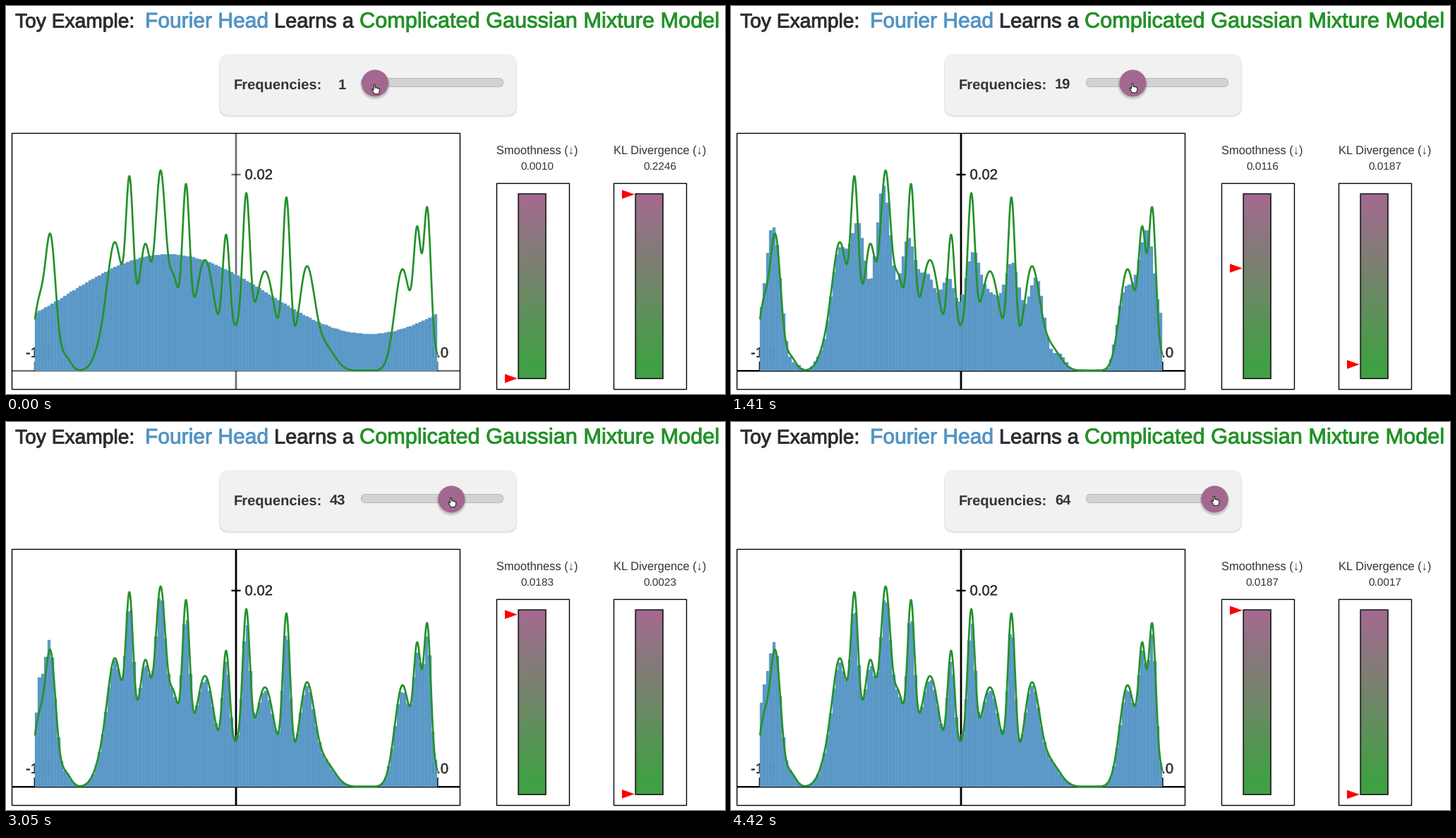
A matplotlib script for the animation above (4490 ms loop, 1019x550 px).

```python
import numpy as np
import matplotlib.pyplot as plt
import matplotlib.patheffects as pe
from matplotlib.animation import FuncAnimation
from matplotlib.collections import PolyCollection
from matplotlib.patches import Circle, FancyBboxPatch, Polygon, Rectangle

W, H, DPI = 1019, 550, 100
LOOP, FRAMES = 4490, 225
PX = 72 / DPI
BINS, LEFT, RIGHT, BASE = 128, 41, 611.5, 517
SPAN = RIGHT - LEFT
FIRST, LAST, REDRAWS = 140, 4420, 65

BLUE, GREEN, PLUM, INK = "#5494c4", "#24922a", "#a2688f", "#333333"

plt.rcParams["font.family"] = "Liberation Sans"
plt.rcParams["text.hinting"] = "no_hinting"

# Gaussians by width: the centre of each and the curve's height there
MIXTURE = {
    5.2: [(175, 276), (255, 265), (312, 193), (340.5, 252), (397.5, 246),
          (583, 205), (597, 232), (610, 28)],
    7.5: [(46, 102), (63, 194), (84, 23), (185, 127), (198, 180),
          (219, 284), (238, 135), (327, 67)],
    11: [(136, 69), (155, 182), (426, 148), (562, 144)],
    14: [(282, 157), (367, 141), (452, 42)],
}
CENTRE, LEVEL, SIGMA = np.array(
    [(x, y, s) for s, group in MIXTURE.items() for x, y in group]).T


def bells(x):
    return np.exp(-0.5 * ((np.asarray(x)[:, None] - CENTRE) / SIGMA) ** 2)


WEIGHT = np.linalg.solve(bells(CENTRE), LEVEL)


def density(x):
    return np.maximum(bells(x) @ WEIGHT, 0.4)


def bin_target():
    """Bin averages of the curve, with extra mass at the left edge."""
    x = LEFT + (np.arange(BINS * 4) + 0.5) * SPAN / (BINS * 4)
    y = (density(x - 1.5) + density(x) + density(x + 1.5)) / 3
    y = 0.975 * y + 40 * np.exp(-((x - 49) / 15) ** 2)
    return y.reshape(BINS, 4).mean(axis=1)


def fourier_fit(target, freq, rounds=120):
    """Non-negative Fourier series of a given degree, by maximum likelihood."""
    if freq == 1:
        x = LEFT + (np.arange(BINS) + 0.5) * SPAN / BINS
        return 108.5 + 56.5 * np.cos(2 * np.pi * (x - 230) / SPAN)

    def power(g):
        p = (g.real ** 2 + g.imag ** 2).sum(axis=0)
        return p * target.mean() / p.mean()

    src = np.arange(2, BINS, 4)[:, None]
    coef = np.sqrt(target[src]) * np.exp(
        -2j * np.pi * src * np.arange(freq + 1) / BINS)
    g = np.fft.ifft(coef, BINS, axis=1)
    for _ in range(rounds):
        coef = np.fft.fft(g * target / (power(g) + 1e-6), axis=1)
        g = np.fft.ifft(coef[:, :freq + 1], BINS, axis=1)
    return power(g)


TARGET = bin_target()
FITS = [fourier_fit(TARGET, k) for k in range(1, 65)]

# Key readings: frequency, smoothness, KL divergence
STOPS, SMOOTH, KL = np.array([
    (1, .0010, .2246), (14, .0084, .0330), (24, .0148, .0106),
    (33, .0171, .0042), (43, .0183, .0023), (54, .0184, .0021),
    (64, .0187, .0017)]).T

fig = plt.figure(figsize=(W / DPI, H / DPI), dpi=DPI, facecolor="white")
ax = fig.add_axes([0, 0, 1, 1])
ax.axis("off")


def label(x, y, text, size, color=INK, ha="left", z=5, bold=False, stroke=0):
    t = ax.text(x, y, text, fontsize=size * PX, color=color, ha=ha,
                va="baseline", zorder=z,
                fontweight="bold" if bold else "normal")
    if stroke:
        t.set_path_effects([pe.withStroke(linewidth=stroke * PX,
                                          foreground=color)])
    return t


def frame(x0, y0, x1, y1, width=1.4, color="black", z=8):
    ax.add_patch(Rectangle((x0, y0), x1 - x0, y1 - y0, fill=False, ec=color,
                           lw=width * PX, zorder=z, snap=False))


def rounded(x0, y0, x1, y1, radius, color, edge="none", alpha=1, z=1):
    style = f"round,pad=0,rounding_size={radius}"
    ax.add_patch(FancyBboxPatch((x0, y0), x1 - x0, y1 - y0, boxstyle=style,
                                fc=color, ec=edge, lw=PX, alpha=alpha,
                                zorder=z, snap=False))


def line(xs, ys, color, width, z):
    return ax.plot(xs, ys, color=color, lw=width * PX, zorder=z,
                   solid_capstyle="butt", snap=False)[0]


# Heading
for x, text, size, color in [
        (13, "Toy Example:", 28.2, "#2d2d32"),
        (197, "Fourier Head", 30, BLUE),
        (380, "Learns a", 29, "#2d2d32"),
        (501, "Complicated Gaussian Mixture Model", 30.7, GREEN)]:
    label(x, 30.5, text, size, color, stroke=0.9)

# Slider
for grow in (3, 2, 1):
    rounded(303 - grow / 2, 70, 723 + grow / 2, 155 + grow, 14, "black",
            alpha=0.045)
rounded(303, 68, 723, 155, 14, "#f1f1f1", z=2)
rounded(503.5, 102.5, 704.5, 114.5, 6, "#d3d3d3", "#b8b8b8", z=3)
label(323, 118, "Frequencies:", 20.2, bold=True)
count = label(481.5, 118, "", 20.2, ha="right", bold=True)

shades = [Circle((0, 0), r, fc="black", ec="none", alpha=0.06, zorder=4)
          for r in (21.5, 20.5, 19.5)]
thumb = Circle((0, 0), 19, fc=PLUM, ec="none", zorder=5)
for disc in shades + [thumb]:
    ax.add_patch(disc)

HAND = np.array([
    (-2.6, -6.5), (-1, -6.5), (-0.5, -2), (1, -2.6), (2, -1.6), (3.5, -1.9),
    (4.2, -0.8), (5.3, -0.6), (5.6, 1), (5, 4), (4, 6.5), (-2, 6.5),
    (-4, 3), (-5.6, 0.6), (-4.5, -0.6), (-2.9, 1)])
hand = Polygon(HAND, fc="white", ec="#222222", lw=1.1 * PX, zorder=6,
               joinstyle="round")
ax.add_patch(hand)

# Chart
frame(8.5, 180.5, 643.5, 543.5)
axis_lines = [line(xs, ys, "black", width, 2) for xs, ys, width in [
    ((326, 326), (181, 543), 2.8), ((9, 643), (517.2, 517.2), 2.4),
    ((319.5, 332.5), (239, 239), 2.4), ((40.5, 40.5), (504, 518), 1.8),
    ((611.7, 611.7), (504, 518), 1.8)]]
label(338.5, 245.5, "0.02", 20.3, stroke=0.4)
label(28, 498, "-1.0", 20.3, z=2, stroke=0.4)
label(627, 498, "1.0", 20.3, ha="right", z=2, stroke=0.4)
bars = PolyCollection([], fc=BLUE, ec="#75a9d1", lw=0.45 * PX, alpha=0.97,
                      zorder=3)
ax.add_collection(bars)
curve_x = np.linspace(LEFT, RIGHT, 900)
line(curve_x, BASE - density(curve_x), GREEN, 2.7, 4)

# Gauges
ramp = np.clip(np.linspace(0, 1.08, 262), 0, 1)[:, None, None]
ramp = ((1 - ramp) * np.array([165, 105, 146])
        + ramp * np.array([64, 160, 67])) / 255


def gauge(x, title, middle):
    label(middle, 209, title, 16.5, ha="center")
    frame(x + 0.5, 251.5, x + 103.5, 543.5)
    ax.imshow(ramp, extent=(x + 31, x + 70, 528, 266), aspect="auto",
              zorder=3)
    frame(x + 31.2, 266.3, x + 70, 528, 1.8, "#222222", 4)
    value = label(middle, 232, "", 15.4, ha="center")
    arrow = Polygon([(0, 0)] * 3, fc="red", ec="none", zorder=5)
    ax.add_patch(arrow)
    return x, value, arrow


smooth_gauge = gauge(695, "Smoothness (↓)", 753)
kl_gauge = gauge(861, "KL Divergence (↓)", 927)
ax.set_xlim(0, W)
ax.set_ylim(H, 0)


def set_gauge(parts, amount, span):
    x, value, arrow = parts
    y = 528 - 261 * (amount - span.min()) / np.ptp(span)
    value.set_text(f"{amount:.4f}")
    arrow.set_xy([(x + 12, y - 6.3), (x + 29.8, y), (x + 12, y + 6.3)])


EDGES = np.linspace(LEFT, RIGHT, BINS + 1)


def bar_shapes(heights):
    top = BASE - heights
    low = np.full(BINS, BASE)
    a, b = EDGES[:-1], EDGES[1:]
    return np.stack([np.stack([a, a, b, b], 1),
                     np.stack([low, top, top, low], 1)], axis=2)


def draw(i):
    now = (i + 1) * LOOP / FRAMES
    step = (LAST - FIRST) / (REDRAWS - 1)
    done = int(np.clip((now - FIRST) // step + 1, 0, REDRAWS))
    freq = max(1, done - 1)

    # Every redraw lays the axes down again, so they darken at first
    for part in axis_lines:
        part.set_alpha(1 - 0.45 ** (done + 1))

    x = 523 + 2.579 * (freq - 1)
    thumb.center = (x, 109.5)
    for disc in shades:
        disc.center = (x, 111.5)
    hand.set_xy(HAND + (x + 1, 118.3 - 0.1 * freq))
    count.set_text(str(freq))

    bars.set_verts(bar_shapes(FITS[freq - 1]))
    set_gauge(smooth_gauge, np.interp(freq, STOPS, SMOOTH), SMOOTH)
    set_gauge(kl_gauge, np.exp(np.interp(freq, STOPS, np.log(KL))), KL)
    return []


anim = FuncAnimation(fig, draw, frames=FRAMES, interval=LOOP / FRAMES,
                     repeat=True, repeat_delay=0, blit=False)
plt.show()
```
